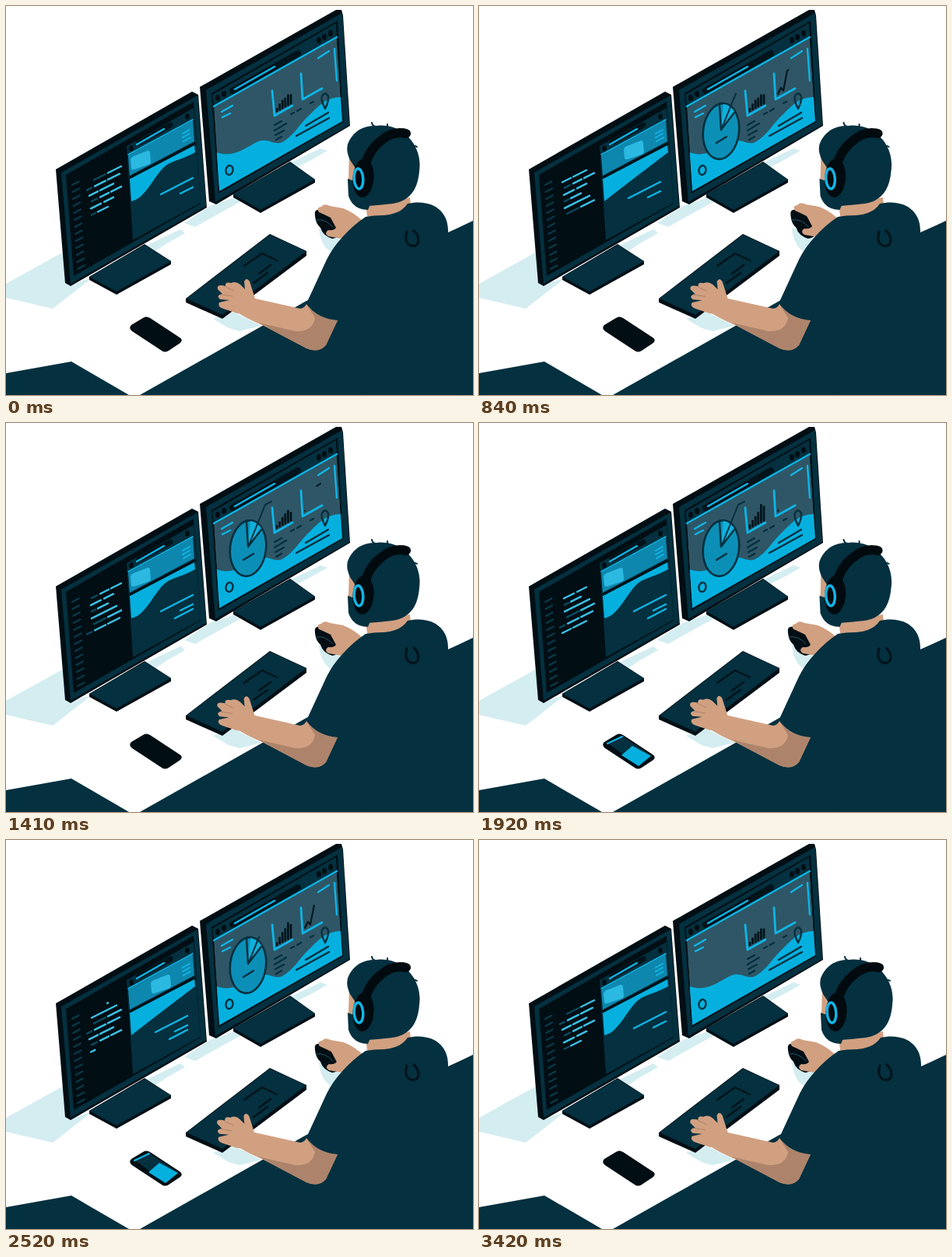
These frames come from a looping animation (600x500 px, 3450 ms). An HTML page:

```html
<!DOCTYPE html>
<html lang="en">
<head>
<meta charset="utf-8">
<title>Developer at work</title>
<style>
  html, body { margin: 0; width: 100%; height: 100%; overflow: hidden; background: #fff; }
  svg { display: block; width: 600px; height: 500px; }
  .navy { fill: #04303f; }
  .black { fill: #010e14; }
  .cyan { fill: #05b0df; }
  .shade { fill: #d4edf1; }
  .skin { fill: #d1a081; }
  .tan { fill: #ad846b; }
  .ln { fill: none; stroke-width: 2.4; stroke-linecap: round; stroke-linejoin: round; }
  .c { stroke: #10b5e6; }
  .n { stroke: #04303f; }
  .k { stroke: #01131b; }
</style>
</head>
<body>
<svg viewBox="0 0 600 500">
  <defs>
    <clipPath id="rightClip"><path d="M267 130L425 41L432 148L274 238Z"/></clipPath>
  </defs>

  <g class="shade">
    <path d="M0 357L74 316L82 358L110 350L60 389L0 375Z"/>
    <path d="M180 308L224 287L230 292L207 305L192 315Z"/>
    <path d="M229 279L262 257L300 244L304 250L243 284Z"/>
    <path d="M362 203L404 183L413 186L390 199L374 207Z"/>
    <path d="M266 402L292 393L328 411L300 418L286 414Z"/>
    <path d="M402 285L432 296L419 317Q404 309 402 285Z"/>
  </g>
  <path class="navy" d="M0 472L84 457L158 500H0ZM172 500L386 379L600 276V500Z"/>

  <!-- stands -->
  <path class="black" d="M107 348L178 306L212 328V332L142 371L107 352Z"/>
  <path class="navy" d="M107 348L178 307L212 328L142 367Z"/>
  <path class="black" d="M292 242L365 200L397 223V227L327 266L292 246Z"/>
  <path class="navy" d="M292 242L365 201L397 223L327 262Z"/>

  <!-- left monitor -->
  <path class="black" d="M64 210L239 110L247 114L258 259L83 360L76 356Z"/>
  <path class="navy" d="M71 214L246 115L257 257L83 357Z"/>
  <path class="black" d="M77 217L241 123L250 254L87 347Z"/>
  <path class="navy" d="M155 180L241 131L250 253L163 301Z"/>
  <path class="ln k" style="stroke-width:7" d="M171 175L211 153"/>
  <path class="ln c" d="M168 178L203 158"/>
  <ellipse class="black" cx="161" cy="183" rx="2.8" ry="3.8"/>
  <ellipse class="black" cx="233" cy="142" rx="2.8" ry="3.8"/>
  <path fill="#0e87ae" d="M157 192L240 147L242 174L159 218Z"/>
  <path class="ln c" style="stroke-width:1.5" d="M157 191L240 146"/>
  <path class="ln c" style="stroke-width:2" d="M227 164L236 159M227 169L236 164M228 174L237 169"/>
  <path id="card" fill="#2bb9e2" d="M164 193L182 186Q185 186 185 189L186 200Q186 203 183 204L165 210Q161 211 161 208L160 197Q161 194 164 193Z"/>
  <path id="hill" class="cyan"/>
  <path class="ln k" style="stroke-width:3.4" d="M160 220L242 177"/>
  <g id="copy" class="ln c"><path d="M199 242L240 221"/><path d="M224 241L240 233"/><path id="third" d="M217 251L240 239"/></g>
  <g id="gutter"></g>
  <g id="code"></g>

  <!-- right monitor -->
  <path class="black" d="M249 104L424 5L431 5L433 12L442 154L270 255L261 251Z"/>
  <path class="navy" d="M257 108L432 9L441 153L269 252Z"/>
  <path class="black" d="M264 112L426 19L433 149L273 241Z"/>
  <path class="navy" d="M265 114L424 22L425 40L267 129Z"/>
  <path class="ln k" style="stroke-width:8" d="M291 109L375 61"/>
  <path class="ln c" d="M294 107L345 78"/>
  <g class="black">
    <ellipse cx="272" cy="118" rx="3" ry="4"/><ellipse cx="280" cy="113" rx="3" ry="4"/>
    <ellipse cx="402" cy="44" rx="3" ry="4"/><ellipse cx="409" cy="40" rx="3" ry="4"/><ellipse cx="417" cy="35" rx="3" ry="4"/>
  </g>
  <g clip-path="url(#rightClip)">
    <path fill="#2e5666" d="M267 130L425 41L432 149L274 238Z"/>
    <path class="cyan" d="M270 188C292 196 308 182 322 175C336 168 344 180 355 175C370 167 378 150 391 139C402 128 412 116 434 117V150L274 240Z"/>
  </g>
  <path class="ln c" d="M267 129L425 40M277 136L291 128M278 143L288 138M401 67L415 58M422 55L425 96"/>
  <path class="ln c" style="stroke-width:2.8" d="M342 109L345 141L368 128M379 87L381 120L406 106"/>
  <path class="ln n" d="M345 153L354 148M345 160L360 151M346 166L357 160M347 172L354 168M366 139L370 137M374 135L379 132M391 125L395 123M385 154L414 137M373 167L415 144"/>
  <path class="ln n" d="M410 132Q404 120 406 116Q410 109 414 116Q415 122 410 132Z"/>
  <ellipse class="ln n" cx="287" cy="211" rx="4.5" ry="6" transform="rotate(12 287 211)"/>
  <g id="bars" class="ln k" style="stroke-linecap:butt;stroke-width:2.7"></g>
  <path id="graph" class="ln k" style="stroke-width:2" pathLength="100" d="M384 113L388 105L391 109L396 83L404 78"/>
  <g id="pie">
    <ellipse cx="311" cy="161" rx="23" ry="36" transform="rotate(7 311 161)" fill="#0c8fb7" stroke="#04303f" stroke-width="2.6"/>
    <path fill="#10b0dc" d="M311 159L314 126Q323 127 329 137Z"/>
    <path class="ln n" d="M311 159L309 127M311 159L328 137M305 176L318 168"/>
  </g>
  <path id="pointer" class="ln n" style="stroke-width:2" pathLength="100" d="M312 157L333 105L341 101"/>

  <!-- desk objects -->
  <path class="black" d="M231 376L339 293L386 315V321L278 402L231 381Z"/>
  <path class="navy" d="M232 376L339 294L386 315L278 397Z"/>
  <path class="ln k" d="M306 334L329 318L348 327M325 344L340 333M318 356L336 343"/>
  <path class="black" d="M161 410L176 401Q180 398 185 401L223 426Q228 429 224 433L209 443Q204 446 200 443L162 418Q157 414 161 410Z"/>
  <g id="phone">
    <path class="navy" d="M166 412L183 402L221 427L205 440Z"/>
    <path class="cyan" d="M197 415L221 428L205 441L183 427Z"/>
    <path class="ln c" style="stroke-width:2" d="M165 412L184 403"/>
  </g>

  <!-- mouse hand -->
  <g id="mouse">
    <path class="black" d="M397 270Q395 260 405 262Q421 268 429 286Q431 298 419 299Q407 295 404 285Q398 280 397 270Z"/>
    <path class="ln" stroke="#245769" style="stroke-width:1" d="M399 275Q410 273 420 284"/>
  </g>
  <path id="hand" class="skin" d="M402 265Q398 259 405 258Q409 253 416 257L433 260Q446 265 458 276L431 299L414 296Q408 292 414 288Q421 289 424 285L417 272Q409 268 402 265Z"/>

  <!-- torso -->
  <path class="skin" d="M462 256L519 246L521 266L465 276Z"/>
  <g id="torso" class="navy">
    <path d="M462 271Q472 269 486 269Q508 267 516 254C542 248 569 259 568 291L602 276V502H460L426 404L386 389Q386 384 388 378L412 326C422 306 440 286 462 271Z"/>
    <path class="ln k" style="stroke-width:3" d="M515 290Q511 304 520 308Q530 310 530 300Q529 293 524 289"/>
  </g>

  <!-- typing arm -->
  <path class="skin" d="M311 374L378 389Q384 388 386 383L426 404L411 436Q400 446 386 440L331 411Q305 400 295 392Z"/>
  <path class="tan" d="M324 407L372 418Q394 419 397 401L386 383Q400 402 426 404L411 436Q402 447 386 440Z"/>
  <path class="navy" d="M386 383Q400 402 426 404L430 390L396 366Z"/>
  <g id="fingers" class="skin">
    <path d="M272 364Q270 357 282 360Q281 354 289 356Q295 353 301 358L307 364L306 354Q309 348 313 354L320 376L316 397L297 395L279 389Q271 386 274 381L287 378L275 377Q269 372 278 370Z"/>
    <path class="ln" stroke="#ad846b" style="stroke-width:1" d="M282 361L293 366M277 371L291 373"/>
  </g>

  <!-- head -->
  <g id="head">
    <path class="skin" d="M441 188L456 190V236L440 224Z"/>
    <path class="navy" d="M439 222L456 228L472 246L465 262Q446 262 440 244Z"/>
    <path class="navy" d="M442 198Q435 183 441 173Q452 153 476 154C508 150 536 178 531 212C529 239 516 251 497 254Q480 256 465 257L448 207Z"/>
    <path class="ln n" style="stroke-width:2" d="M476 155Q471 155 470 150M486 156Q491 156 490 152M520 182Q524 178 528 181"/>
    <path class="ln" stroke="#010a0e" style="stroke-width:12" d="M460 210Q465 186 482 173Q497 160 514 164"/>
    <ellipse fill="#010a0e" cx="459" cy="221" rx="13.5" ry="25" transform="rotate(4 459 221)"/>
    <ellipse class="ln c" style="stroke-width:3.5" cx="453" cy="222" rx="5.8" ry="13" transform="rotate(-4 453 222)"/>
  </g>
</svg>
<script>
const LOOP = 3450, HALF = LOOP / 2;
const $ = id => document.getElementById(id);
const mix = (a, b, k) => a + (b - a) * k;
const clamp = k => Math.max(0, Math.min(1, k));
const ease = k => k * k * (3 - 2 * k);
const ramp = (t, a, b) => ease(clamp((t - a) / (b - a)));
const pulse = (t, a, b, c, d) => ramp(t, a, b) - ramp(t, c, d);
const move = (id, x, y) => $(id).setAttribute('transform', `translate(${x} ${y})`);
const wave = (t, n, shift = 0) => Math.sin(2 * Math.PI * (n * t / LOOP + shift));

function stroke(parent, d, color, width) {
  const p = document.createElementNS('http://www.w3.org/2000/svg', 'path');
  p.setAttribute('d', d);
  if (color) p.setAttribute('stroke', color);
  if (width) { p.setAttribute('stroke-width', width); p.setAttribute('stroke-linecap', 'round'); }
  return parent.appendChild(p);
}

for (let i = 0; i < 13; i++) {
  const x = 85 + i * .6, y = 230 + i * 9;
  stroke($('gutter'), `M${x} ${y}l8.5 -4.5`, '#0a3a49', 2.2);
}

// dash extents of each code row; a negative start marks a dim dash
const rows = [
  [-113, 128, 131, 148], [-104, 110, 114, 128, 131, 146], [107, 118, 121, 138],
  [-110, 117, 121, 132, 135, 148], [109, 122, 126, 138], [-110, 115, 118, 131], [110, 142]
];
const SHOWN = 7, ROW = 8.7;
const dashes = Array.from({ length: SHOWN * 3 }, () => stroke($('code'), '', '', 2.5));
const bars = Array.from({ length: 6 }, () => stroke($('bars'), ''));

function drawCode(t) {
  const pos = t / LOOP * rows.length, first = Math.floor(pos), part = pos - first;
  const lift = ROW * ease(clamp(part * 5));
  for (let i = 0; i < SHOWN; i++) {
    const row = rows[(first + i) % rows.length];
    for (let j = 0; j < 3; j++) {
      const dash = dashes[i * 3 + j], full = row[j * 2 + 1];
      let start = Math.abs(row[j * 2]), end = full;
      if (i === 0) start = Math.max(start, 104 + 46 * clamp(part * 5));
      if (i === SHOWN - 1) end = Math.min(full, 104 + 46 * clamp(part * 2));
      const y = x => 228 + i * ROW - lift - (x - 104) * .5;
      dash.setAttribute('d', full && end > start ? `M${start} ${y(start)}L${end} ${y(end)}` : '');
      dash.setAttribute('stroke', row[j * 2] < 0 ? '#0b4a5d' : '#3cc0e4');
    }
  }
}

function drawPage(h) {
  const k = pulse(h, 480, 760, 930, 1230);
  move('card', 26 * k, -13 * k);
  move('copy', -7 * k, 5 * k);
  const p = (x, y, flat) => `${x} ${mix(y, flat, k)}`;
  $('hill').setAttribute('d', `M159 222L242 179L243 188C${p(230, 195, 198)} ${p(222, 197, 204)} ${p(213, 201, 211)}` +
    `C${p(193, 207, 226)} ${p(183, 247, 234)} 161 251Z`);
}

function drawDash(id, from, to) {
  const s = $(id).style;
  s.strokeDasharray = `0 ${from} ${Math.max(0, to - from)} 200`;
  s.visibility = to - from > .5 ? 'visible' : 'hidden';
}

function draw(t) {
  const h = t % HALF;
  drawCode(t);
  drawPage(h);
  $('third').style.opacity = pulse(t, 1150, 1300, 2600, 2800);

  drawDash('graph', 100 * ramp(h, 980, 1520), 100 * ramp(h, 120, 1080));
  const size = pulse(t, 240, 600, 2890, 3230);
  $('pie').setAttribute('transform', `translate(311 160) scale(${size}) translate(-311 -160)`);
  drawDash('pointer', 0, 100 * pulse(t, 560, 980, 2340, 2720));

  const grow = pulse(t, 1500, 1850, 2500, 2900);
  bars.forEach((bar, i) => {
    const x = 348 + i * 3.6, y = 136 - i * 1.9;
    const tall = [5, 8, 11, 13, 16, 13][i] * (1 + .08 * wave(t, 4, i / 5)) + grow * [0, 1, 2, 4, 8, 6][i];
    bar.setAttribute('d', `M${x} ${y}v${-tall}`);
  });

  $('phone').style.visibility = t >= 1710 && t < 3300 ? 'visible' : 'hidden';
  const nod = pulse(t, 480, 760, 1000, 1320) + pulse(t, 1560, 1840, 2080, 2400);
  move('head', -1.5 * nod, 0);
  move('torso', -nod, 0);
  const slide = pulse(t, 420, 740, 980, 1320);
  move('mouse', 3.5 * slide, 0);
  move('hand', 4 * slide + 2 * pulse(t, 1600, 1840, 2300, 2700), -2 * slide);
  move('fingers', .7 * wave(t, 12), .7 * wave(t, 10));
}

const begin = performance.now();
function tick() {
  const t = (performance.now() - begin) % LOOP;
  draw(Math.floor(t / 30) * 30);
  requestAnimationFrame(tick);
}
draw(0);
requestAnimationFrame(tick);
</script>
</body>
</html>
```
